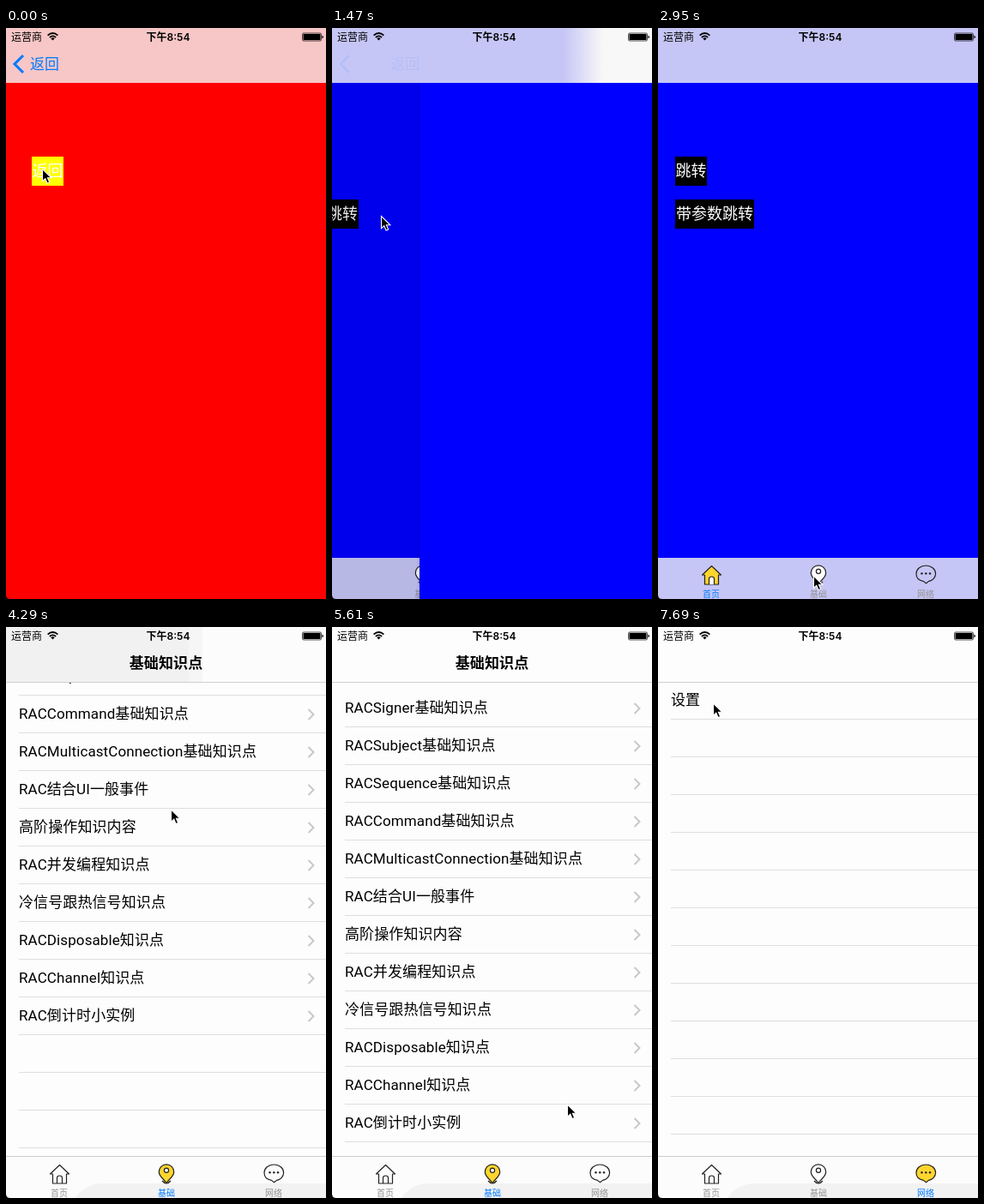
Write an HTML page that moves like this. It is 373 by 666 pixels and loops after 7.99 s.

```html
<!DOCTYPE html>
<html lang="zh-CN">
<head>
<meta charset="utf-8">
<title>Navigation demo</title>
<style>
  html, body { margin: 0; width: 100%; height: 100%; overflow: hidden; background: #fff; }
  #stage {
    position: relative; width: 373px; height: 666px; overflow: hidden; color: #000;
    font: 17px Roboto, "Noto Sans CJK SC", "Noto Sans CJK", sans-serif;
  }
  #stage div, #stage svg, #stage span { position: absolute; white-space: nowrap; }
  .page { left: 0; top: 0; width: 373px; height: 666px; overflow: hidden; background: #fdfdfd; }
  #home, #detail { background: #00f; }
  #detail { box-shadow: 0 0 4px rgba(0, 0, 0, .2); }
  #detail.red { background: #f00; box-shadow: none; }
  #detail:not(.red) .btn { display: none; }
  #dim { inset: 0; background: #000; }
  .btn { height: 34px; line-height: 34px; text-align: center; font-size: 18px; color: #fff; background: #000; }
  .row { left: 15px; width: 358px; height: 43px; line-height: 43px; letter-spacing: .1px; border-bottom: 1px solid #dedee0; }
  .row svg { left: 336px; top: 15px; }
  .tabs { left: 0; top: 617px; width: 373px; height: 49px; overflow: hidden; background: #fcfcfc; }
  .tabs.plain { border-top: 1px solid #cacaca; height: 48px; }
  #home .tabs { top: 618px; background: #c6c6f6; }
  .tabs svg { left: 0; top: 0; }
  .tabs text { font-size: 10px; text-anchor: middle; }
  #nav { left: 0; top: 0; width: 373px; height: 64px; }
  #line { left: 0; top: 64px; width: 373px; height: 1px; background: #d0d0d0; }
  #title { left: 0; width: 373px; top: 30px; line-height: 24px; text-align: center; font-weight: 700; letter-spacing: .1px; }
  #back { left: 0; top: 0; color: #007aff; }
  #label { left: 28px; top: 30px; line-height: 24px; }
  #status { left: 0; top: 0; }
  #status text { font: 12px Inter, "Noto Sans CJK SC", "Noto Sans CJK", sans-serif; }
  #cursor { left: 0; top: 0; overflow: visible; }
</style>
</head>
<body>
<div id="stage">
  <div class="page" id="home">
    <div class="btn" style="left:20px;top:150px;width:37px">跳转</div>
    <div class="btn" style="left:20px;top:200px;width:92px">带参数跳转</div>
    <div id="dim"></div>
  </div>
  <div class="page" id="detail">
    <div class="btn" style="left:30px;top:150px;width:37px;background:#ff0">返回</div>
  </div>
  <div class="page" id="basics"><div id="list" style="left:0;top:0"></div></div>
  <div class="page" id="network"></div>

  <div id="nav">
    <div id="line"></div>
    <div id="title">基础知识点</div>
    <div id="back">
      <svg width="24" height="64" fill="none" stroke="#007aff" stroke-width="3"><path d="M20 32 10 42 20 52"/></svg>
      <span id="label">返回</span>
    </div>
  </div>

  <svg id="status" width="373" height="20">
    <text x="6" y="14.5">运营商</text>
    <text x="189" y="14.5" text-anchor="middle" style="font-weight:600">下午8:54</text>
    <g fill="none" stroke="#000" stroke-width="1.8">
      <path d="M48.6 8.6Q54.5 3.4 60.4 8.6M50.9 11Q54.5 7.8 58.1 11"/>
    </g>
    <path d="M52.3 12.2Q54.5 10.4 56.7 12.2L54.5 14.6Z"/>
    <rect x="345.5" y="6" width="22" height="9" rx="1.5" fill="none" stroke="#000" stroke-width=".7"/>
    <rect x="346.5" y="7" width="20" height="7" rx=".6"/>
    <path d="M368.5 8.7q1.4 .3 1.4 1.8t-1.4 1.8z"/>
  </svg>
  <svg width="5" height="5" style="left:0;top:661px"><path d="M0 0Q0 5 5 5H0Z"/></svg>
  <svg id="cursor" width="12" height="18">
    <path d="M0 0V14.2L3.3 11.2 5.6 16.6 8.2 15.5 5.9 10.3H10.4Z" stroke="#fff" stroke-width="1.1"/>
  </svg>
</div>

<script>
const LOOP = 7990, STEP = 147.9, W = 373;
const $ = id => document.getElementById(id);
const add = (parent, html) => parent.insertAdjacentHTML('beforeend', html);

// Tab bar
const icons = [
  '<path d="M51.5 20 62.5 9.5 73.5 20H70.5V31H54.5V20Z"/><path d="M59.5 31V24.5Q59.5 22 62.5 22T65.5 24.5V31" fill="HOLE"/>',
  '<path d="M182 28q5 6 10 0"/><path d="M187 30.5C184 26 178.3 23 178.3 17.5a8.7 8.7 0 0 1 17.4 0C195.7 23 190 26 187 30.5Z"/><circle cx="187" cy="15.8" r="2.6" fill="#fff"/>',
  '<path d="M312.5 29.8 309.5 27.4C304 26.5 301 23 301 18.5C301 13 306 9 312.3 9S323.6 13 323.6 18.5C323.6 23 320 26.5 315.5 27.4Z"/><g fill="#222" stroke="none"><circle cx="307.5" cy="18.2" r="1.2"/><circle cx="312.3" cy="18.2" r="1.2"/><circle cx="317" cy="18.2" r="1.2"/></g>'
];
function addTabs(page, active) {
  const plain = active > 0;
  const items = icons.map((shape, i) => {
    const on = i === active;
    const fill = on ? '#ffd52e' : i === 1 ? '#fff' : 'none';
    return `<g fill="${fill}" stroke="#222" stroke-width="1.2" stroke-linejoin="round">${shape.replace('HOLE', on ? '#fff' : 'none')}</g>
      <text x="${62 + i * 125}" y="46" fill="${on ? '#007aff' : '#929292'}">${['首页', '基础', '网络'][i]}</text>`;
  }).join('');
  const shade = plain ? '<path d="M80 49Q92 31 114 31H373V49Z" fill="#f2f2f2"/>' : '';
  add(page, `<div class="tabs ${plain ? 'plain' : ''}"><svg width="373" height="49">${shade}${items}</svg></div>`);
}

// Table rows, padded with empty ones
function addRows(parent, names, arrow) {
  for (let i = 0; i < 17; i++) {
    const mark = arrow && names[i]
      ? '<svg width="12" height="14" fill="none" stroke="#c7c7cc" stroke-width="2"><path d="M1.5 1 7.5 7 1.5 13"/></svg>' : '';
    add(parent, `<div class="row" style="top:${64 + i * 44}px">${names[i] || ''}${mark}</div>`);
  }
}
const topics = ['Signer', 'Subject', 'Sequence', 'Command', 'MulticastConnection'].map(n => `RAC${n}基础知识点`);
topics.push('RAC结合UI一般事件', '高阶操作知识内容', 'RAC并发编程知识点', '冷信号跟热信号知识点',
  'RACDisposable知识点', 'RACChannel知识点', 'RAC倒计时小实例');
addRows($('list'), topics, true);
addRows($('network'), ['设置'], false);
['home', 'basics', 'network'].forEach((id, i) => addTabs($(id), i));
$('home').append($('dim'));

// Cursor path: time, x, y
const path = [
  [0, 42.5, 164.5], [450, 42.5, 164.5], [1035, 57.5, 219.5], [1700, 57.5, 219.5],
  [2360, 35, 42], [2516, 35, 42], [2958, 181.5, 639], [3410, 181.5, 639],
  [3850, 188, 481], [4289, 192.5, 213], [4437, 192.5, 200], [4500, 192.5, 200],
  [4881, 187.5, 509], [5330, 200, 540], [5620, 274.5, 557], [6508, 303, 636],
  [7000, 303, 636], [7690, 64.5, 89], [LOOP, 64.5, 89]
];
function cursorAt(t) {
  const i = Math.max(1, path.findIndex(p => p[0] >= t));
  const [a, b] = [path[i - 1], path[i]];
  const u = (t - a[0]) / (b[0] - a[0]);
  return [a[1] + (b[1] - a[1]) * u, a[2] + (b[2] - a[2]) * u];
}

const clamp = v => Math.min(1, Math.max(0, v));
const ease = (t, start) => 1 - (1 - clamp((t - start) / 500)) ** 3;

// Share of the detail page that covers the home page
const coverAt = t => t < 1000 ? 1 - ease(t, 130) : t < 2400 ? ease(t, 1304) : 1 - ease(t, 2440);

// Rubber-band scrolling from the press point, then the bounce back
const PRESS = 481, RELEASE = 5330, VIEW = 553;
function rubber(d) {
  const k = Math.abs(d) * .55 / VIEW;
  return Math.sign(d) * VIEW * k / (1 + k);
}
function scrollAt(t) {
  if (t < 3850) return 0;
  if (t < RELEASE) return rubber(PRESS - cursorAt(t)[1]);
  return rubber(PRESS - 540) * Math.exp((RELEASE - t) / 240);
}

function navFill(tab, cover, red, shift, scroll) {
  if (tab === 1 && scroll > 20) return 'linear-gradient(90deg,#f1f1f1 213px,#f6f6f6 213px 229px,#fcfcfc 229px)';
  if (tab > 0) return '#fdfdfd';
  if (cover === 1) return red ? '#f7c6c6' : '#c6c6f6';
  if (cover === 0) return '#c6c6f6';
  const edge = W + shift;
  return `linear-gradient(90deg,#c6c6f6 ${edge - 22}px,#f8f8f8 ${edge + 24}px)`;
}

function draw(t) {
  const tab = t < 3400 ? 0 : t < 6800 ? 1 : 2;
  const red = t < 1000, cover = coverAt(t);
  const shift = Math.round(-.3 * W * cover), scroll = Math.round(scrollAt(t));

  ['home', 'basics', 'network'].forEach((id, i) => $(id).style.display = i === tab ? '' : 'none');
  $('home').style.transform = `translateX(${shift}px)`;
  $('dim').style.opacity = .1 * cover;
  $('detail').className = red ? 'page red' : 'page';
  $('detail').style.display = tab === 0 && cover > 0 ? '' : 'none';
  $('detail').style.transform = `translateX(${Math.round(W * (1 - cover))}px)`;
  $('list').style.transform = `translateY(${-scroll}px)`;

  $('nav').style.background = navFill(tab, cover, red, shift, scroll);
  $('line').style.display = tab > 0 ? '' : 'none';
  $('title').style.display = tab === 1 ? '' : 'none';
  $('back').style.opacity = tab === 0 ? clamp((cover - .7) / .3) : 0;
  $('label').style.transform = `translateX(${147 * (1 - cover)}px)`;

  const [x, y] = cursorAt(t);
  $('cursor').style.transform = `translate(${x}px,${y}px)`;
}

// The screen refreshes about seven times a second
function tick() {
  const t = performance.now() % LOOP;
  draw(Math.min(LOOP, Math.floor((t + 20) / STEP) * STEP));
  requestAnimationFrame(tick);
}
tick();
</script>
</body>
</html>
```
